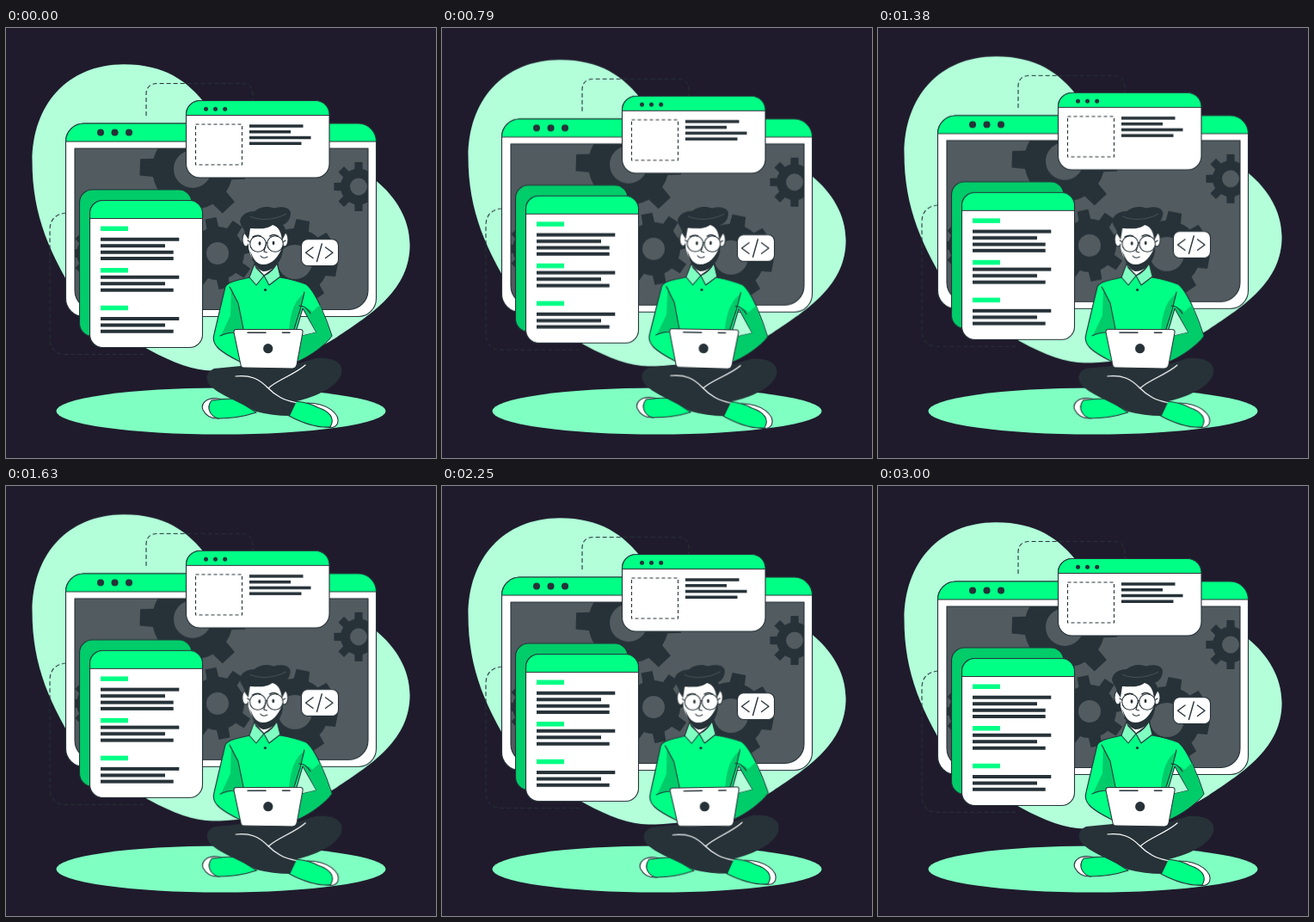
An HTML page for the animation above (3040 ms loop, 500 px wide and 500 px high).

```html
<!DOCTYPE html>
<html lang="en">
<head>
<meta charset="utf-8">
<title>Developer at work</title>
<style>
  html, body { margin: 0; width: 100%; height: 100%; overflow: hidden; background: #1f1b2c; }
  svg { display: block; width: 100%; height: 100%; }

  .main { fill: #00ff85; }
  .shade { fill: #00cc6a; }
  .soft { fill: #80ffc2; }
  .pale { fill: #b2ffda; }
  .white { fill: #fff; }
  .dark { fill: #263238; }
  .grey { fill: #515b60; }
  .edge { stroke: #263238; stroke-width: 1.1; stroke-linejoin: round; stroke-linecap: round; }
  .line { fill: none; stroke: #263238; stroke-width: 1.1; stroke-linejoin: round; stroke-linecap: round; }
  .dash { fill: none; stroke: #263238; stroke-width: 1.1; stroke-dasharray: 5 3; }
  .seam { fill: none; stroke: #fff; stroke-width: 1.2; stroke-linecap: round; }
  .text { fill: none; stroke: #263238; }

  /* 3 s of motion, then a 40 ms rest */
  .float { animation: float 3040ms linear infinite; }
  .sway { animation: sway 3040ms linear infinite; transform-origin: 310px 336px; }
  @keyframes float {
    0%, 98.684%, 100% { transform: translateY(0); }
    49.342% { transform: translateY(-10px); }
  }
  @keyframes sway {
    0%, 49.342%, 98.684%, 100% { transform: rotate(0); }
    24.671% { transform: rotate(1deg); }
    74.013% { transform: rotate(-1deg); }
  }
</style>
</head>
<body>
<svg viewBox="0 0 500 500">
  <defs>
    <path id="glass" d="M80 140H421V305A22.500 22.500 0 0 1 398.500 327.500H102.500A22.500 22.500 0 0 1 80 305Z"/>
    <clipPath id="screen"><use href="#glass"/></clipPath>
  </defs>

  <ellipse class="soft" cx="250" cy="445.5" rx="191.500" ry="27"/>

  <g class="float">
    <path class="pale" d="M137 42.300C184 42.300 211 61 234 91C268 132 300 138 350 142C405 150 469.600 192 469.600 252C469.600 304 426 332 384 360C340 388 285 398.500 240 398.500C198 398.500 138 360 88 322C51 264 30.500 218 30.500 155C30.500 90 71 42.300 137 42.300Z"/>
    <path class="dash" d="M163 102V77Q163 64.500 177 64.500H274Q287 64.500 287 78V90"/>
    <path class="dash" d="M70 215Q51 217 51 235V360Q51 379.500 71 379.500H160"/>

    <!-- monitor -->
    <rect class="white edge" x="69.500" y="111" width="361" height="224.500" rx="21"/>
    <path class="main edge" d="M69.500 132A21 21 0 0 1 90.500 111H409.500A21 21 0 0 1 430.500 132Z"/>
    <g class="dark">
      <circle cx="110" cy="121.500" r="4"/><circle cx="126.500" cy="121.500" r="4"/><circle cx="143" cy="121.500" r="4"/>
    </g>
    <use href="#glass" class="grey edge"/>
    <g id="gears" clip-path="url(#screen)"></g>

    <!-- popup -->
    <rect class="white edge" x="209.500" y="84.500" width="166.500" height="89.500" rx="16"/>
    <path class="main edge" d="M209.500 101.500V100.500A16 16 0 0 1 225.500 84.500H360A16 16 0 0 1 376 100.500V101.500Z"/>
    <g class="dark">
      <circle cx="232.500" cy="94.200" r="2.500"/><circle cx="243.500" cy="94.200" r="2.500"/><circle cx="254.700" cy="94.200" r="2.500"/>
    </g>
    <rect class="dash" x="220.500" y="112" width="54" height="47" style="stroke-dasharray:4 3"/>
    <path class="text" stroke-width="3.500" d="M283 114H345.500M283 120.700H331M283 127.500H354.500M283 134.200H343.500"/>

    <!-- documents -->
    <rect class="shade edge" x="85.500" y="188" width="130.500" height="170.500" rx="15"/>
    <rect class="white edge" x="97.500" y="200.500" width="131" height="171" rx="15"/>
    <path class="main edge" d="M97.500 221.500V215.500A15 15 0 0 1 112.500 200.500H213.500A15 15 0 0 1 228.500 215.500V221.500Z"/>
    <path fill="none" stroke="#00ff85" stroke-width="5.500" d="M110 233.200H142M110 281.700H142M110 325.500H142"/>
    <path class="text" stroke-width="4" d="M110 245.800H201.300M110 253.300H185M110 260.800H194.700M110 268H194.700M110 289.700H201.300M110 297.200H185M110 304.700H194.700M110 338H201.300M110 345.400H185M110 352.800H194.700"/>

    <!-- code bubble -->
    <rect class="white edge" x="343.500" y="245.700" width="43" height="30.800" rx="7"/>
    <path class="line" style="stroke-width:1.400" d="M357 255L348.500 261.200L357 267.500M367.300 251L361.500 271.500M371.500 255L380 261.200L371.500 267.500"/>
  </g>

  <g class="sway">
    <!-- shoes -->
    <path class="white edge" d="M247 431C233 429 226 437 229 444C233 452 240 454.500 248 454L252 432Z"/>
    <path class="main edge" d="M239 433C232 442 238 452 247 454C262 454 279 451 291 447L266 431C255 431 246 432 239 433Z"/>
    <path class="white edge" d="M350 436C374 436 389 449 385.500 460Q383 465 376 464.500L357 461Z"/>
    <path class="main edge" d="M336 434C346 435 355 437 362 441C377 446 383 454 377 464C364 465 346 460 329 451Z"/>

    <!-- legs -->
    <path class="dark" d="M242 396C231 401 231 411 241 419C252 428 276 437 291 446Q310 451 330 451L338 434C360 429 386 417 390 402C393 389 380 382.500 360 384L338 391L273 393Z"/>
    <path class="seam" d="M267 405C284 403 294 408 304 418C314 428 323 433 337 435.500M348 392C334 404 315 409 305 419"/>

    <!-- shirt: the right arm leaves a gap beside the torso -->
    <path class="main edge" fill-rule="evenodd" d="M284 290C270 293 258 295 255 301L242 356C238 368 248 376 272 388L338 388C353 382 371 369 379 358C373 339 360 306 349 298Q336 293 319 290L301 288ZM345 326L361 354L344 358L338 350Z"/>
    <path class="shade" d="M262 302L270 320L275.500 350L267 352L250 357.500L261 334Z"/>
    <path class="shade" d="M346.500 309L342 328L336 350H329Q332 318 346.500 309Z"/>
    <path class="shade" d="M346 326Q352 325 356 330L365 322L378.500 358C371 368 353 381 338.500 387.500L344 358L361 354Z"/>
    <path class="line" d="M260 301L270 320L276 350M249 358Q257 354 267 354M347 307L342 328L335 350M341 323Q349 323 354 332"/>

    <!-- neck and collar -->
    <path class="white edge" d="M291 266L289 276L300 288L316 276L314 264Z"/>
    <path class="soft edge" d="M289 274L283 290L291 299L300 288L291 279Z"/>
    <path class="soft edge" d="M315 273L319 289L306 299L300 288Q311 283 315 273Z"/>
    <circle class="dark" cx="301.500" cy="304.500" r="1.600"/>

    <!-- head -->
    <ellipse class="white edge" cx="279" cy="246" rx="4" ry="8"/>
    <ellipse class="white edge" cx="324" cy="246" rx="4" ry="8"/>
    <path class="white" d="M282 230V256Q287 276 300 279Q315 276 322 255V231Q302 222 282 230Z"/>
    <path class="dark" d="M284 259C288 270 292 275 299 275C309 275 317 267 322 253V260C319 275 309 283 299 283C291 281 286 270 284 259Z"/>
    <path class="dark" d="M278 240C278 234 273 231 272 225C273 217 281 213 289 213C296 207 305 207 312 209.500C320 207 330 208 331 215C331 222 327 227 322 229Q326 233 325 239L321 247C320 237 317 231 310 229C302 235 291 233 284 233L282 246Z"/>
    <path fill="none" stroke="#515b60" stroke-width=".8" d="M284 219C293 224 312 224 326 216"/>
    <g class="line">
      <circle cx="293" cy="251" r="9.300"/><circle cx="313" cy="251" r="9.300"/>
      <path d="M302.200 250Q303 248 304 250M284 249L281 247M322 249L325 247M302 252L300 260L303.500 261M296 265Q299 269 304 266"/>
      <path style="stroke-width:1.600" d="M287 243Q292 240 296 242M307 242Q311 239 316 242"/>
    </g>
    <ellipse class="dark" cx="295" cy="250.500" rx="1.400" ry="2.300"/>
    <ellipse class="dark" cx="311" cy="250" rx="1.400" ry="2.300"/>

    <!-- laptop -->
    <path class="white edge" d="M265 354Q264.500 350.500 268 350.500H342Q345.500 350.500 345 354L338 392Q337 396 333 396L277 395Q273.500 395 273 392Z"/>
    <path class="line" style="stroke-width:1.500" d="M281 354.200H302M321.500 354.200H330"/>
    <circle class="dark" cx="304.700" cy="372.700" r="5.600"/>
  </g>
</svg>
<script>
  const TEETH = 8;

  // Toothed wheel: root arcs joined by one tapered tooth per sector
  function gear(x, y, outer, body, hole, turn) {
    const at = (r, deg) => {
      const a = deg * Math.PI / 180;
      return (x + r * Math.cos(a)).toFixed(1) + " " + (y + r * Math.sin(a)).toFixed(1);
    };
    let d = "";
    for (let i = 0; i < TEETH; i++) {
      const a = turn + i * 360 / TEETH;
      d += (i ? `A${body} ${body} 0 0 1 ` : "M") + at(body, a - 13);
      d += "L" + at(outer, a - 9) + "L" + at(outer, a + 9) + "L" + at(body, a + 13);
    }
    return `<path class="dark" d="${d}Z"/><circle class="grey" cx="${x}" cy="${y}" r="${hole}"/>`;
  }

  document.getElementById("gears").innerHTML = [
    [217, 164, 62, 47, 22, 2],
    [104, 262, 29, 22, 9, 0],
    [336, 272, 50, 39, 20, 11],
    [246, 262, 42, 31, 13, -11],
    [410, 184.5, 29, 21, 10, 0]
  ].map(g => gear(...g)).join("");
</script>
</body>
</html>
```
